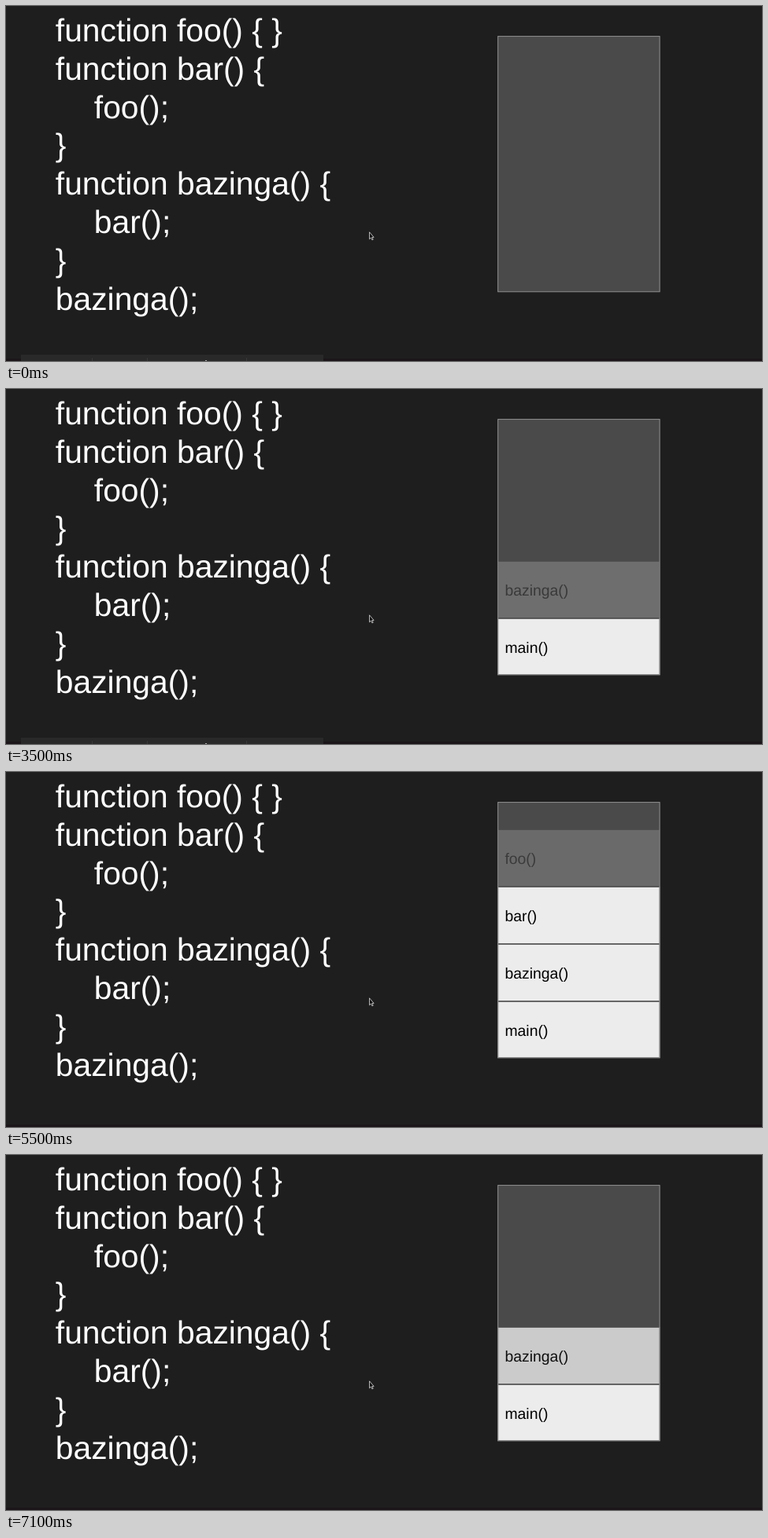
An HTML page that plays this animation: 960 px wide and 452 px high, repeating every 7.2 s.

```html
<!DOCTYPE html>
<html lang="en">
<head>
<meta charset="utf-8">
<title>Call stack</title>
<style>
  html, body { margin: 0; width: 100%; height: 100%; overflow: hidden; background: #1e1e1e; }
  svg {
    display: block; width: 960px; height: 452px;
    font-family: "Liberation Sans", Arial, sans-serif; text-rendering: geometricPrecision;
  }
</style>
</head>
<body>
<svg viewBox="0 0 960 452">
  <rect width="960" height="452" fill="#1e1e1e"/>
  <rect y="449" width="960" height="3" fill="#1b1519"/>
  <g id="bar">
    <rect x="19" y="444" width="384" height="8" fill="#292929"/>
    <path d="M109.5 448v4M179.5 448v4M305.5 448v4" stroke="#383838"/>
    <rect x="253" y="451" width="2" height="1" fill="#aaa"/>
  </g>
  <g id="code" font-size="40.8" fill="#fff"></g>
  <rect x="624.7" y="38.6" width="205.4" height="325.2" fill="#4a4a4a"/>
  <g id="stack" font-size="19.4"></g>
  <rect x="624.7" y="38.6" width="205.4" height="325.2" fill="none" stroke="#929292"/>
  <path d="M461.5 287.8v9l2-1.8 1.4 2.9 1.3-.6-1.3-2.8h2.2z" fill="#111" stroke="#ddd" stroke-width=".8"/>
</svg>
<script>
const LOOP = 7200, STEP = 100, FADE_IN = 1000;
const $ = id => document.getElementById(id);

function add(parent, tag, attrs, text = "") {
  const el = document.createElementNS("http://www.w3.org/2000/svg", tag);
  for (const key in attrs) el.setAttribute(key, attrs[key]);
  el.textContent = text;
  parent.append(el);
  return el;
}

const lines = ["function foo() { }", "function bar() {", "\tfoo();", "}",
  "function bazinga() {", "\tbar();", "}", "bazinga();"];
lines.forEach((line, i) =>
  add($("code"), "text", { x: line[0] === "\t" ? 111.8 : 62.8, y: 45 + 48.8 * i }, line.trim()));

// Each call fades in from `start`, then out between `leave` and `gone`.
const calls = [
  { name: "main()", start: 2210, leave: 9000, gone: 9500 },
  { name: "bazinga()", start: 3280, leave: 7000, gone: 7500 },
  { name: "bar()", start: 4240, leave: 6480, gone: 7000 },
  { name: "foo()", start: 5300, leave: 6000, gone: 6500 }
];
calls.forEach((call, i) => {
  const y = 292.5 - 73 * i;
  call.el = add($("stack"), "g", { opacity: 0 });
  add(call.el, "rect", { x: 624.7, y, width: 205.4, height: i ? 72 : 71.3, fill: "#ececec", stroke: "#666" });
  add(call.el, "text", { x: 633.4, y: y + 43 }, call.name);
});

const clamp = v => Math.max(0, Math.min(1, v));

function draw(now) {
  const t = Math.floor((now % LOOP) / STEP) * STEP;
  for (const { el, start, leave, gone } of calls) {
    const shown = t < 2400 ? 0 : clamp((t - start) / FADE_IN);
    const left = clamp((gone - t) / (gone - leave));
    el.setAttribute("opacity", Math.min(shown, left));
  }
  $("bar").setAttribute("opacity", clamp((4500 - t) / 800));
  requestAnimationFrame(draw);
}
draw(0);
</script>
</body>
</html>
```
